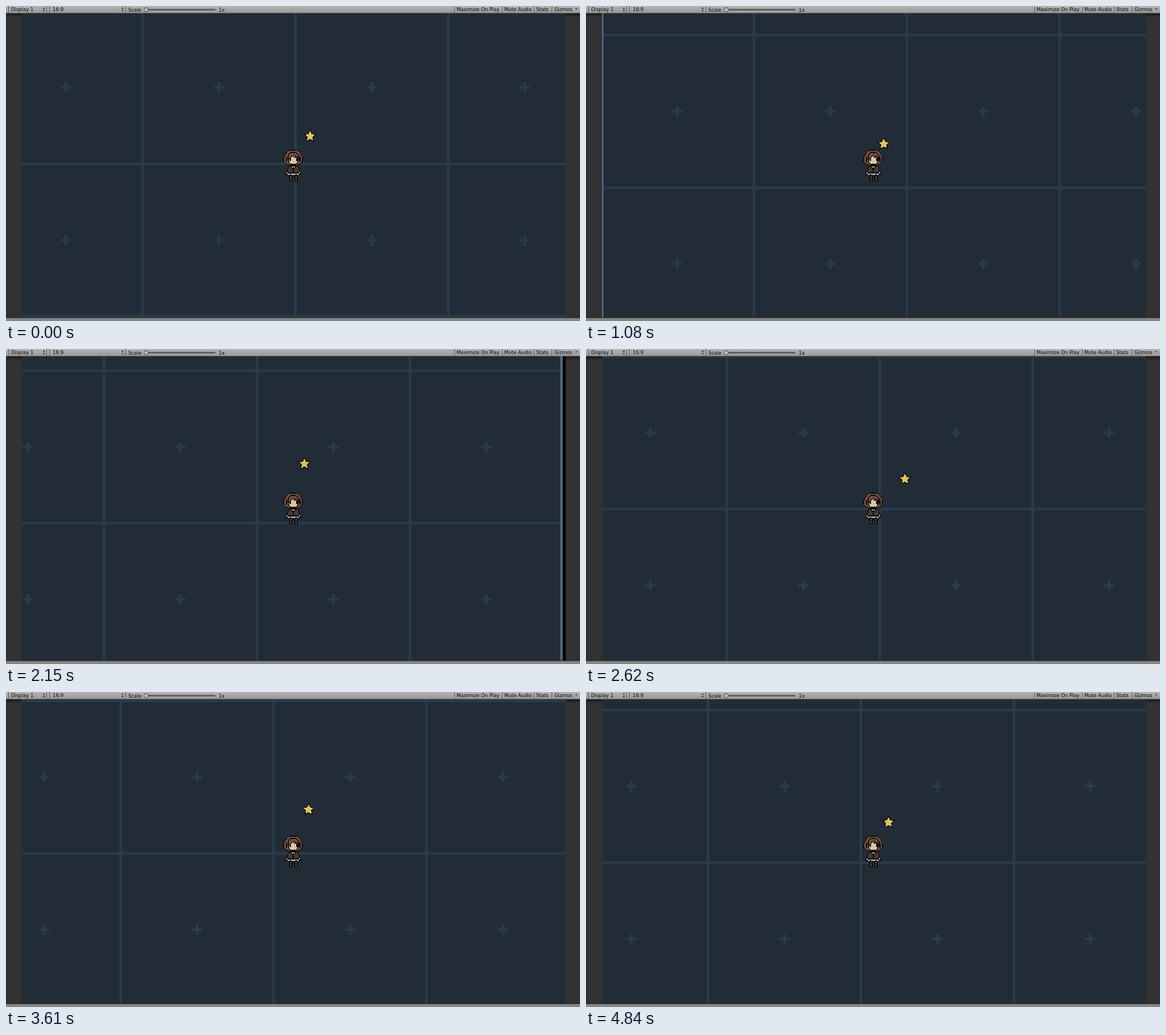
Write an HTML page that moves like this. It is 1009 by 555 pixels and loops after 5.01 s.

```html
<!DOCTYPE html>
<html lang="en">
<head>
<meta charset="utf-8">
<title>Follower demo</title>
<style>
  html, body { margin: 0; width: 100%; height: 100%; overflow: hidden; background: #323232; }
  svg { display: block; width: 100vw; height: 100vh; }
  text { font: 8.5px "DejaVu Sans", sans-serif; fill: #080808; }
</style>
</head>
<body>
<svg viewBox="0 0 1009 555">
  <defs>
    <linearGradient id="bar" x2="0" y2="1">
      <stop stop-color="#b4b4b4"/><stop offset="1" stop-color="#999"/>
    </linearGradient>
    <linearGradient id="shade" x2="0" y2="1">
      <stop stop-color="#181818"/><stop offset="1" stop-color="#323232"/>
    </linearGradient>
    <clipPath id="view"><path d="M28 13H984V549H28z"/></clipPath>
  </defs>

  <path fill="#323232" d="M0 0H1009V555H0z"/>
  <path fill="url(#shade)" d="M0 12H1009V20H0z"/>
  <path fill="#222" d="M0 12H1V549H0z"/>

  <g clip-path="url(#view)">
    <path d="M28 13H984V549H28z"/>
    <g id="room">
      <path id="floor" fill="#222c36"/>
      <path id="lines" stroke="#283c4b" stroke-width="4.6"/>
      <path id="marks" stroke="#283c4b" stroke-width="4.6"/>
      <path id="walls" stroke="#506a86" stroke-width="4"/>
    </g>

    <g stroke="#0b0808" stroke-width="1.3" shape-rendering="crispEdges">
      <path fill="#d9c5a8" d="M499 298h4v10h-4zM508 298h4v10h-4z"/>
      <path d="M499 302h4M508 302h4M499 305h4M508 305h4"/>
      <path fill="#d9c5a8" d="M495 290l-3 4v3h3l3-4zM515 290l3 3v3h-3l-3-4z"/>
      <path fill="#4a372f" d="M498 280h15l3 11-3 4h-16l-3-4z"/>
      <path fill="#8fa5b3" d="M497 294h16l4 3-3 2h-18l-3-2z"/>
      <path fill="#e4dfd3" d="M500 282l5 6 5-6z"/>
      <path d="M505 284v9M500 296v3M510 296v3"/>
      <path fill="#74503f" d="M500 254h10l6 3 3 6 2 4v7l-3 4-4 1-2 2h-14l-2-2-4-1-4-4v-7l3-5 3-5z"/>
      <path fill="#d9c5a8" d="M498 264h15v11l-3 4h-10l-3-4z"/>
      <path fill="#74503f" d="M496 271v-8l4-5h9l6 5v8l-4-5-4 1-3-3-4 3-2 3z"/>
      <path fill="none" d="M505 261l4 4 4 1M493 266v9M517 266v9"/>
      <path stroke-width="2.4" d="M500 268v5M511 268v5"/>
    </g>

    <path id="star" fill="#dcc45e" stroke="#100e08" stroke-width="1.4" shape-rendering="crispEdges"/>
  </g>

  <path fill="url(#bar)" d="M0 0H1009V12H0z"/>
  <path id="seams" stroke="#5c5c5c"/>
  <path fill="#333" d="M64.5 5l2-3 2 3zM64.5 7l2 3 2-3zM203 5l2-3 2 3zM203 7l2 3 2-3zM1000.5 4h4l-2 2.5z"/>
  <path stroke="#555" stroke-width="2.5" stroke-linecap="round" d="M250 6.5H367"/>
  <circle cx="246.5" cy="6.5" r="3.8" fill="#bbb" stroke="#444"/>
  <text x="9" y="9">Display 1</text>
  <text x="82" y="9">16:9</text>
  <text x="215" y="9.5">Scale</text>
  <text x="374" y="9.5">1x</text>
  <text x="792" y="9">Maximize On Play</text>
  <text x="876" y="9">Mute Audio</text>
  <text x="932" y="9">Stats</text>
  <text x="964" y="9">Gizmos</text>
  <path fill="#858585" d="M0 549.5H1009V555H0z"/>
  <path stroke="#202020" d="M0 549H1009"/>
</svg>

<script>
const LOOP = 5010, HOLD = 300, STEP = 76.9, LAST = 60;
const TILE = 268.8, COLS = 4, ROWS = 3;
const $ = id => document.getElementById(id);
const setPath = (id, d) => $(id).setAttribute('d', d);
const move = (id, x, y) => $(id).setAttribute('transform', `translate(${x} ${y})`);

// Turning points of the walk: [step, room position]
const walkX = [[0, 240], [6, 313], [9.5, 313], [11, 295], [14, 295], [24, 172.5], [25, 172.5],
  [32, 260], [37, 260], [42, 201.5], [45, 201.5], [51, 276], [53, 276], [58, 214.5], [LAST, 214.5]];
const walkY = [[0, 278], [2, 298], [9, 298], [11, 320], [16, 381], [19, 381], [25, 307], [27, 282],
  [32, 282], [37, 342.5], [39, 345.5], [44, 284.5], [47, 253], [52, 253], [56, 300.5], [LAST, 300.5]];

function along(walk, step) {
  const i = Math.max(1, walk.findIndex(key => key[0] >= step));
  const [s0, p0] = walk[i - 1], [s1, p1] = walk[i];
  return p0 + (p1 - p0) * (step - s0) / (s1 - s0);
}

// The star trails the walk, catching up faster once the girl stands still.
function lag(walk, step) {
  let gap = 0;
  for (let s = 1; s <= step; s++) {
    const shift = along(walk, s) - along(walk, s - 1);
    gap = (gap + shift) * (Math.abs(shift) > 1 ? .72 : .33);
  }
  return gap;
}

function buildRoom() {
  const w = TILE * COLS, h = TILE * ROWS;
  let lines = '', marks = '';
  for (let c = 1; c < COLS; c++) lines += `M${c * TILE} ${-h}V${h}`;
  for (let r = -ROWS; r <= ROWS; r++) {
    lines += `M0 ${r * TILE}H${w}`;
    for (let c = 0; c < COLS; c++)
      marks += `M${(c + .5) * TILE - 9} ${(r + .5) * TILE}h18m-9 -9v18`;
  }
  setPath('floor', `M0 ${-h}H${w}V${h}H0z`);
  setPath('lines', lines);
  setPath('marks', marks);
  setPath('walls', `M2.5 ${-h}V${h}M${w - 2.5} ${-h}V${h}`);
}

function buildStar() {
  const points = Array.from({ length: 10 }, (_, i) => {
    const r = i % 2 ? 5.4 : 10.8, a = i * Math.PI / 5;
    return `${r * Math.sin(a)} ${-r * Math.cos(a)}`;
  });
  setPath('star', `M${points.join('L')}z`);
}

function draw(now) {
  const t = now % LOOP;
  const step = t < HOLD ? 0 : Math.min(LAST, Math.floor((t - HOLD) / STEP) + 1);
  move('room', along(walkX, step) - TILE, along(walkY, step));
  move('star', 534.5 + lag(walkX, step), 229.5 + lag(walkY, step));
}

setPath('seams', 'M0 12.5H1009' +
  [4, 71, 76, 210, 788, 872, 928, 959].map(x => `M${x + .5} 0V12`).join(''));
buildRoom();
buildStar();
const start = performance.now();
function tick() {
  draw(performance.now() - start);
  requestAnimationFrame(tick);
}
tick();
</script>
</body>
</html>
```
